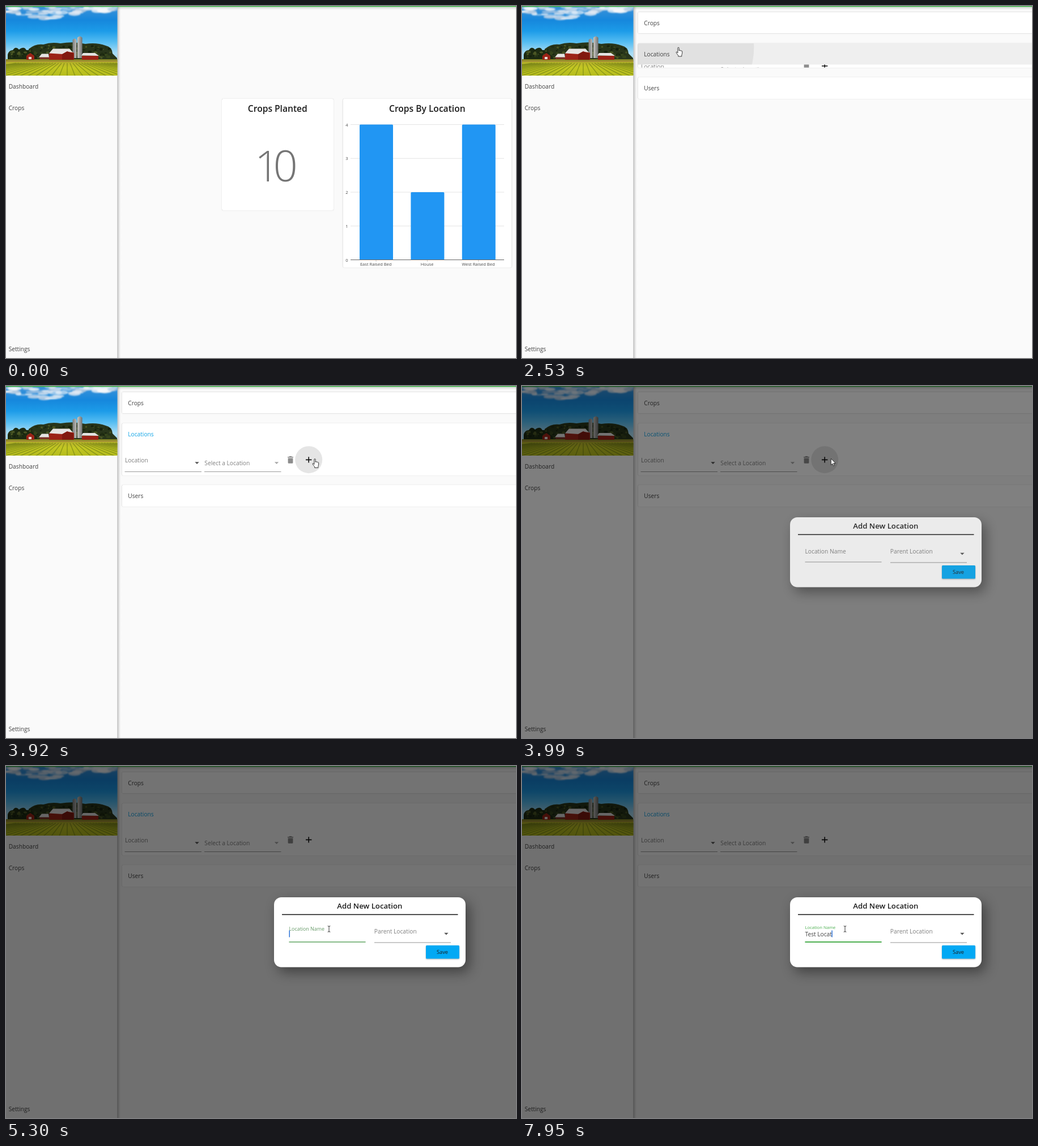
Write an HTML page that moves like this. It is 900 px wide and 622 px high and loops after 8000 ms.

```html
<!DOCTYPE html>
<html lang="en">
<head>
<meta charset="utf-8">
<title>Farm dashboard</title>
<style>
html, body { margin: 0; width: 100%; height: 100%; overflow: hidden; background: #fafafa; }
svg { display: block; width: 100%; height: 100%; }
text { font: 10.2px "Open Sans", "Noto Sans", sans-serif; fill: #424242; white-space: pre; }
.mid { text-anchor: middle; }
.hint { fill: #808080; font-size: 10.25px; }
.title { font-weight: 600; fill: #1c1c1c; text-anchor: middle; }
.tick { font-size: 7.55px; fill: #4a4a4a; text-anchor: middle; }
.card { fill: #fff; filter: drop-shadow(0 .8px .5px rgba(0,0,0,.26)) drop-shadow(0 0 .8px rgba(0,0,0,.1)); }
.cursor { fill: #fff; stroke: #222; stroke-width: .9; stroke-linejoin: round; }
</style>
</head>
<body>
<svg viewBox="0 0 900 622">
  <defs>
    <linearGradient id="sky" x2="0" y2="1">
      <stop offset="0" stop-color="#3f93d8"/><stop offset=".25" stop-color="#1687dc"/>
      <stop offset=".45" stop-color="#1c9be8"/><stop offset=".65" stop-color="#55bdf2"/><stop offset=".85" stop-color="#a9dcf5"/>
    </linearGradient>
    <linearGradient id="field" x2="0" y2="1">
      <stop offset="0" stop-color="#7f7d24"/><stop offset=".22" stop-color="#b9b42a"/>
      <stop offset=".5" stop-color="#c3c722"/><stop offset="1" stop-color="#b4bb1c"/>
    </linearGradient>
    <linearGradient id="silo">
      <stop offset="0" stop-color="#7d7f80"/><stop offset=".5" stop-color="#c9c7c2"/><stop offset="1" stop-color="#6f7172"/>
    </linearGradient>
    <linearGradient id="side">
      <stop offset="0" stop-opacity=".3"/><stop offset=".35" stop-opacity=".12"/><stop offset="1" stop-opacity="0"/>
    </linearGradient>
    <linearGradient id="under" x2="0" y2="1">
      <stop offset="0" stop-opacity=".14"/><stop offset="1" stop-opacity="0"/>
    </linearGradient>
    <filter id="soft" x="-20%" y="-40%" width="140%" height="180%"><feGaussianBlur stdDeviation="1.2"/></filter>
    <clipPath id="photoClip"><rect y="1" width="196.5" height="122"/></clipPath>
    <clipPath id="navClip"><rect y="586.5" width="196.5" height="36"/></clipPath>
    <clipPath id="headClip"><path d="M204.5 103.5V69q0-3 3-3H900v37.5z"/></clipPath>
    <clipPath id="bodyClip"><rect id="bodyBox" x="204.5" y="103.5" width="696" height="0"/></clipPath>
  </defs>

  <rect width="900" height="622" fill="#fafafa"/>

  <g id="dashboard">
    <rect class="card" x="381" y="164" width="197" height="197" rx="2.5"/>
    <rect class="card" x="594.5" y="164" width="298" height="298" rx="2.5"/>
    <text class="title" x="479.3" y="187" style="font-size:15.6px">Crops Planted</text>
    <text class="title" x="743.3" y="187" style="font-size:15.6px">Crops By Location</text>
    <text x="439" y="310" style="font-size:75px;font-weight:300;letter-spacing:-10px;fill:#757575">10</text>
    <g id="chart"></g>
  </g>

  <g id="settings">
    <rect class="card" x="204.5" y="10.5" width="710" height="38" rx="2.5"/>
    <text x="215.3" y="33.8">Crops</text>
    <rect id="panel" class="card" x="204.5" y="66" width="710" height="38" rx="2.5"/>
    <g clip-path="url(#headClip)">
      <rect id="headFill" x="204" y="66" width="696" height="38"/>
      <circle id="headRipple" cx="276" cy="73"/>
    </g>
    <text id="headText" x="215.3" y="89">Locations</text>
    <g id="content" clip-path="url(#bodyClip)">
      <g id="body">
        <text class="hint" x="210" y="135">Location</text>
        <text class="hint" x="350.3" y="140.3">Select a Location</text>
        <path d="M209.5 151.5h135.5M350 151.5h135.5" stroke="#9a9a9a"/>
        <path d="M333.3 134.3h7.4l-3.7 3.7z" fill="#555"/>
        <path d="M473.8 134.3h7.4l-3.7 3.7z" fill="#a8a8a8"/>
        <path d="M497 125h2.4l.8-1h3.6l.8 1h2.4v1.5h-10zM497.6 127.4h8.8v8q0 1.4-1.4 1.4h-6q-1.4 0-1.4-1.4z" fill="#8c8c8c"/>
        <circle id="plusRipple" cx="534.2" cy="130.2"/>
        <path d="M529 130.4h10.4M534.2 125.2v10.4" stroke="#111" stroke-width="1.6"/>
      </g>
    </g>
    <g id="users">
      <rect class="card" x="204.5" y="121" width="710" height="38" rx="2.5"/>
      <text x="215.3" y="144.4">Users</text>
    </g>
  </g>

  <rect x="197" y="2" width="703" height="5" fill="url(#under)"/>
  <rect width="197" height="622" fill="#fafafa"/>
  <rect x="196.5" width="6" height="622" fill="url(#side)"/>
  <g clip-path="url(#photoClip)">
    <rect width="197" height="98" fill="url(#sky)"/>
    <g id="clouds" filter="url(#soft)"></g>
    <path d="M40 97V76Q52 66 66 68Q80 63 96 66Q120 62 140 67Q160 64 176 70Q187 72 188 84L196 92V97z" fill="#28351a"/>
    <path d="M3 97V86Q5 78 12 78Q17 70 23 77Q32 70 36 78Q46 76 50 86L62 97z" fill="#1c2a12"/>
    <g id="trees"></g>
    <rect y="94" width="197" height="30" fill="url(#field)"/>
    <g id="rows" stroke="#6f7d14" fill="none"></g>
    <path d="M0 97.500h197" stroke="#a8853f"/>
    <path d="M117.500 92V60q3.500-5 7 0v32zM126 92V56q4.300-5 8.600 0v36z" fill="url(#silo)"/>
    <path d="M76 95V84l8-5h28l8 4v12zM134 95V88h29v7zM36 95v-7l7-5 7 5v7z" fill="#9c2317"/>
    <path d="M59 94v-4h17v4z" fill="#7a3426"/>
    <path d="M76 83.500l7-8h29l6 6.500-10-1-8 4zM133 87.500l3-4.500h21l7 5zM58 90.500l5-6h12l1 6z" fill="#e6e4e2"/>
    <path d="M99 95V85l9-5 11 4v11z" fill="#82190f"/>
    <path d="M40 94v-4h5v4z" fill="#e8dcd4"/>
  </g>
  <g clip-path="url(#navClip)">
    <rect id="navFill" y="586.5" width="197" height="36" fill="#f0f0f0"/>
    <circle id="navRipple" cx="42" cy="604"/>
  </g>
  <text x="4.700" y="145.700">Dashboard</text>
  <text x="4.700" y="183.700">Crops</text>
  <text x="4.700" y="610">Settings</text>
  <rect width="900" height="1.600" fill="#3fae49"/>

  <rect id="shade" width="900" height="622"/>
  <g id="dialog">
    <rect x="473" y="232" width="338" height="123.500" rx="13" fill="#fff" style="filter:drop-shadow(7px 9px 11px rgba(0,0,0,.42))"/>
    <text class="title" x="641.800" y="252" style="font-size:13.2px">Add New Location</text>
    <path d="M487 262.500h310.500" stroke="#111" stroke-width="1.500"/>
    <path d="M499.500 311h135" stroke="#949494"/>
    <path id="focusLine" d="M499.500 311h135" stroke="#4caf50" stroke-width="1.800"/>
    <text id="label" class="hint" x="499.500">Location Name</text>
    <text id="typed" x="499.500" y="300.800"></text>
    <rect id="caret" y="290.500" width="1.500" height="12" fill="#2f74d8"/>
    <text class="hint" x="649.800" y="295.700">Parent Location</text>
    <path d="M650 312h135" stroke="#949494"/>
    <path d="M773.200 294.800h7.400l-3.700 3.700z" fill="#555"/>
    <rect x="741" y="317" width="59" height="23.500" rx="1.500" fill="#03a9f4" style="filter:drop-shadow(0 1px 1px rgba(0,0,0,.3))"/>
    <text class="mid" x="770" y="332.400" style="font-size:9.300px;fill:#1c1c1c">Save</text>
  </g>

  <g id="pointer" class="cursor">
    <path id="arrow" d="M.3.300v11.400l2.600-2.500 1.700 4 1.800-.800-1.700-3.800h3.600z"/>
    <path id="hand" d="M-1.100 10.500V1.800a1.100 1.100 0 0 1 2.200 0V6.400a1 1 0 0 1 2 .3a1 1 0 0 1 1.900.4a1 1 0 0 1 1.700.5V11c0 1.500-.9 2.200-.9 3.200V16.500H-.300V14.800C-1.100 13.400-3.300 11.600-3.900 9.600c-.2-1 .9-1.400 1.500-.7z"/>
    <path id="beam" d="M-2.300.300q2.300-.3 2.300 1.200q0-1.500 2.300-1.200M0 1.500v8M-2.300 10.700q2.300.3 2.300-1.200q0 1.500 2.300 1.200" fill="none"/>
  </g>
</svg>
<script>
const LOOP = 8000;
const el = {};
document.querySelectorAll('[id]').forEach(n => el[n.id] = n);
const set = (node, attrs) => { for (const k in attrs) node.setAttribute(k, attrs[k]); };
const add = (parent, tag, attrs, text) => {
  const n = document.createElementNS('http://www.w3.org/2000/svg', tag);
  set(n, attrs);
  if (text !== undefined) n.textContent = text;
  parent.appendChild(n);
};
const show = (node, on) => { node.style.display = on ? '' : 'none'; };
const clamp = v => Math.max(0, Math.min(1, v));
const ramp = (t, start, span) => clamp((t - start) / span);
const within = (t, a, b) => t >= a && t < b;

function bezier(x1, y1, x2, y2) {
  const at = (a, b, u) => 3 * a * u * (1 - u) ** 2 + 3 * b * u * u * (1 - u) + u ** 3;
  return x => {
    let lo = 0, hi = 1;
    for (let i = 0; i < 24; i++) {
      const m = (lo + hi) / 2;
      if (at(x1, x2, m) < x) lo = m; else hi = m;
    }
    return x <= 0 ? 0 : x >= 1 ? 1 : at(y1, y2, lo);
  };
}
const decel = bezier(0, 0, .2, 1);
const standard = bezier(.4, 0, .2, 1);
const swift = bezier(.25, .8, .25, 1);

let seed = 7;
const rnd = () => (seed = seed * 16807 % 2147483647) / 2147483647;
const pick = list => list[Math.floor(rnd() * list.length)];

function buildPhoto() {
  // cloud bank: thickest left of the middle, thin towards both edges
  for (let i = 0; i < 80; i++) {
    const x = rnd() * 197, depth = 9 + 15 * Math.exp(-(((x - 70) / 45) ** 2));
    const y = 1 + rnd() * depth;
    add(el.clouds, 'ellipse', {
      cx: x, cy: y, rx: 4 + rnd() * 9, ry: 1.2 + rnd() * 2.6,
      opacity: .35 + rnd() * .55, fill: pick(['#f6f8fb', '#e3ebf4', '#b5cbe2'])
    });
  }
  // foliage highlights and shadows
  for (let i = 0; i < 150; i++) {
    const x = 5 + rnd() * 182, top = x < 45 ? 79 : 68 + 5 * Math.abs(x - 105) / 80;
    add(el.trees, 'ellipse', {
      cx: x, cy: top + rnd() * (92 - top), rx: 1 + rnd() * 2.5, ry: 1 + rnd() * 1.6,
      fill: pick(['#16210d', '#1f2c12', '#35441c', '#4a5624'])
    });
  }
  for (let i = -18; i <= 18; i++) {
    add(el.rows, 'path', {
      d: `M${108 + i * 5} 101Q${108 + i * 8} 108 ${108 + i * 14} 124`, 'stroke-width': 1.5, opacity: .6
    });
  }
}

function buildChart() {
  for (let v = 0; v <= 4; v++) {
    const y = 448.5 - v * 59.75;
    if (v) add(el.chart, 'path', { d: `M608 ${y}h271`, stroke: '#e4e4e4' });
    add(el.chart, 'text', { class: 'tick', x: 601.5, y: y + 3 }, v);
  }
  [['East Raised Bed', 4], ['House', 2], ['West Raised Bed', 4]].forEach(([name, v], i) => {
    const x = 624 + i * 90.4, h = v * 59.75;
    add(el.chart, 'path', { d: `M${x} 448.5v${1.5 - h}q0-1.500 1.500-1.500h56q1.500 0 1.500 1.500v${h - 1.5}z`, fill: '#2196f3' });
    add(el.chart, 'path', { d: `M${x + 29} 449v3`, stroke: '#bbb', 'stroke-width': .8 });
    add(el.chart, 'text', { class: 'tick', x: x + 28.7, y: 459.4 }, name);
  });
  add(el.chart, 'path', { d: 'M608 448.5h271', stroke: '#666' });
}

// time, x, y of the pointer's hot spot
const path = [
  [460, 600, 601], [540, 470, 593], [620, 290, 588], [770, 110, 592], [920, 42, 602.5],
  [1600, 42, 602.5], [1760, 120, 430], [1920, 240, 190], [2040, 283, 105], [2150, 276, 72.5],
  [2640, 276, 72.5], [2840, 310, 105], [3150, 440, 126], [3380, 505, 133], [3610, 545, 128],
  [4370, 545, 128], [4530, 572, 230], [4690, 582, 310], [4840, 582, 310], [5150, 570, 282.5], [LOOP, 570, 282.5]
];
function pointerAt(t) {
  const i = Math.max(1, path.findIndex(k => k[0] > t));
  const [t0, x0, y0] = path[i - 1], [t1, x1, y1] = path[i], p = ramp(t, t0, t1 - t0);
  return [x0 + (x1 - x0) * p, y0 + (y1 - y0) * p];
}

// time, number of letters typed
const phrase = 'Test Locat';
const strokes = [[6400, 1], [6630, 2], [6710, 3], [6780, 4], [7320, 5], [7550, 6], [7700, 7], [7780, 9], [7950, 10]];

function drawPages(t) {
  show(el.dashboard, t < 1290);
  show(el.settings, t >= 1290);
  show(el.navFill, within(t, 860, 1640));
  set(el.navRipple, { r: 151 * decel(ramp(t, 1256, 225)), opacity: .04 * (1 - ramp(t, 1400, 110)) });

  const h = 54 * standard(ramp(t, 2492, 225));
  set(el.panel, { height: 38 + h });
  show(el.content, h > 0);
  set(el.bodyBox, { height: h + .3 });
  set(el.body, { transform: `translate(0 ${(h - 54) / 2})` });
  set(el.users, { transform: `translate(0 ${h})` });
  const tint = t < 2060 ? 0 : t < 2380 ? .035 : .063 * (1 - ramp(t, 2740, 150));
  set(el.headFill, { opacity: tint });
  set(el.headRipple, { r: 620 * decel(ramp(t, 2502, 450)), opacity: .06 * (1 - ramp(t, 2780, 330)) });
  el.headText.style.fill = t < 2580 ? '#424242' : '#12a5e6';
  set(el.plusRipple, { r: 24 * decel(ramp(t, 3810, 110)), opacity: .1 * (1 - ramp(t, 4000, 150)) });
}

function drawDialog(t) {
  set(el.shade, { opacity: .55 * decel(ramp(t, 3940, 85)) });
  set(el.dialog, { opacity: decel(ramp(t, 3940, 100)) });
  show(el.dialog, t >= 3940);

  const p = swift(ramp(t, 5234, 400));
  const mix = (a, b) => Math.round(a + (b - a) * p);
  set(el.label, { y: 295.7 - 8.2 * p });
  el.label.style.fontSize = 10.25 - 2.6 * p + 'px';
  el.label.style.fill = `rgb(${mix(128, 76)},${mix(128, 175)},${mix(128, 80)})`;
  set(el.focusLine, { opacity: p });

  let count = 0;
  for (const [at, n] of strokes) if (t >= at) count = n;
  el.typed.textContent = phrase.slice(0, count);
  set(el.caret, { x: 499.5 + (count ? el.typed.getComputedTextLength() - .5 : 0) });
  show(el.caret, t >= 5234 && !within(t, 5770, 6230) && !within(t, 7240, 7320));
}

function drawPointer(t) {
  const [x, y] = pointerAt(t);
  const hand = within(t, 860, 1640) || within(t, 2060, 2830) || within(t, 3540, 3950);
  const beam = t >= 4840;
  show(el.pointer, t >= 460);
  set(el.pointer, { transform: `translate(${x} ${y})` });
  show(el.hand, hand);
  show(el.beam, beam);
  show(el.arrow, !hand && !beam);
}

function draw(t) {
  drawPages(t);
  drawDialog(t);
  drawPointer(t);
}

buildPhoto();
buildChart();
const begin = performance.now();
function frame() {
  draw((performance.now() - begin) % LOOP);
  requestAnimationFrame(frame);
}
draw(0);
requestAnimationFrame(frame);
</script>
</body>
</html>
```
